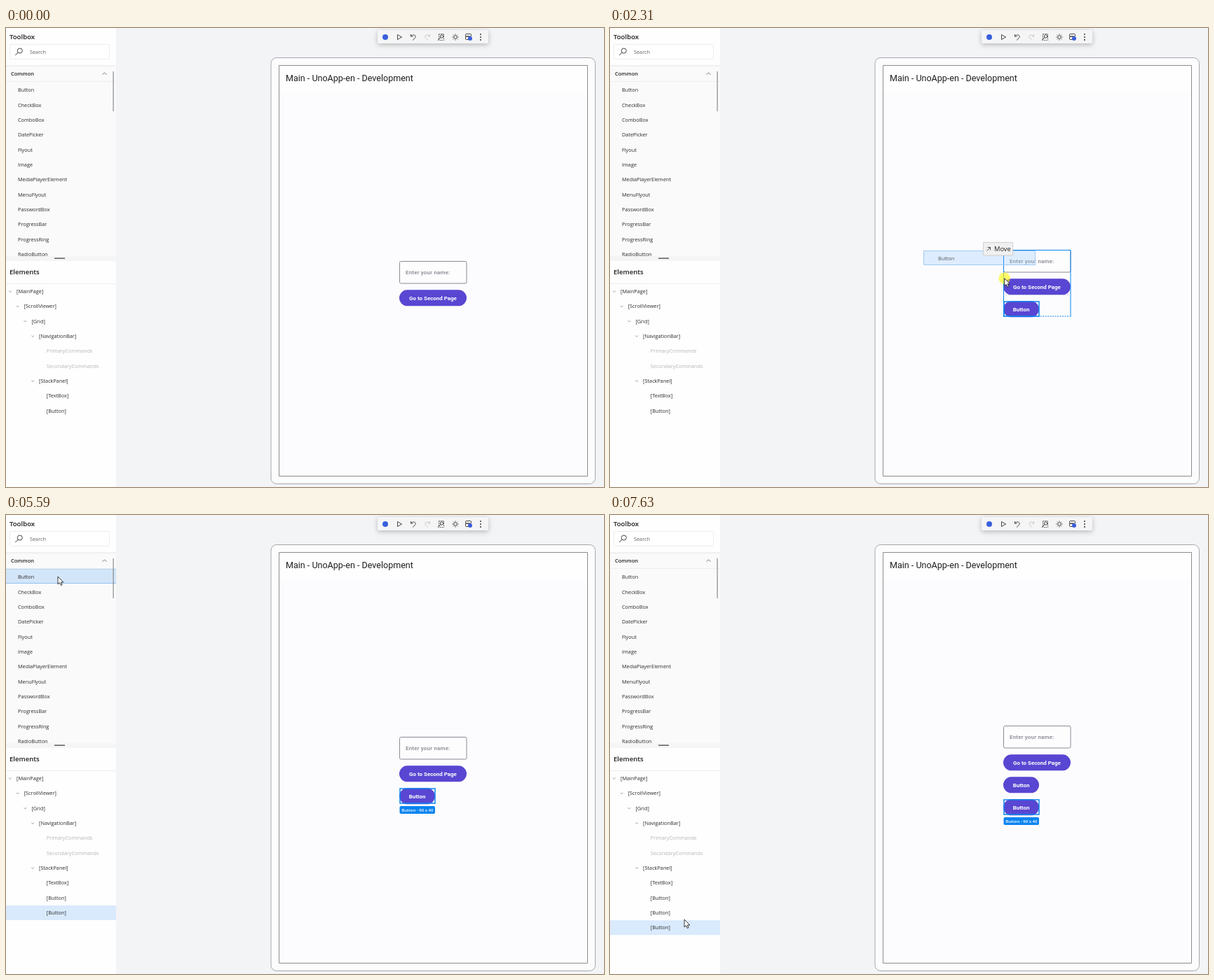
Write an HTML page with a canvas that moves like this. It is 853 px wide and 656 px high and loops after 8 s.

```html
<!DOCTYPE html>
<html lang="en">
<head>
<meta charset="utf-8">
<title>Drag from toolbox</title>
<style>
html, body { margin: 0; width: 853px; height: 656px; overflow: hidden; }
canvas { display: block; }
</style>
</head>
<body>
<canvas id="stage" width="853" height="656"></canvas>
<script>
const ctx = document.getElementById('stage').getContext('2d');
const LOOP = 8000, ROW = 21.33, LAG = 70;
const BLUE = '#0a84f0', PURPLE = '#5946d2', INK = '#2b2b2b';
const SANS = '"Open Sans", sans-serif', ROBOTO = 'Roboto, sans-serif';

const TOOLS = ['Button', 'CheckBox', 'ComboBox', 'DatePicker', 'Flyout', 'Image', 'MediaPlayerElement',
  'MenuFlyout', 'PasswordBox', 'ProgressBar', 'ProgressRing', 'RadioButton'];
// depth, label
const TREE = [[0, 'MainPage'], [1, 'ScrollViewer'], [2, 'Grid'], [3, 'NavigationBar'], [4, 'PrimaryCommands'],
  [4, 'SecondaryCommands'], [3, 'StackPanel'], [4, 'TextBox'], [4, 'Button']];

// pointer path: time, x, y
const PATH = [[160, 500, 420], [940, 86, 104], [1000, 86, 90], [1610, 86, 90], [2010, 393, 226], [2370, 582, 375],
  [2760, 594, 401], [2830, 594, 404], [3640, 594, 404], [4460, 192, 262], [4810, 90, 138], [5120, 74, 88],
  [5590, 74, 88], [6050, 160, 200], [6240, 150, 318], [6380, 113, 470], [6460, 108, 545], [6950, 106, 578],
  [8000, 106, 578]];

function slope(i, k) {
  const a = PATH[i - 1], b = PATH[i], c = PATH[i + 1];
  if (!a || !c || (b[k] - a[k]) * (c[k] - b[k]) <= 0) return 0;
  return (c[k] - a[k]) / (c[0] - a[0]);
}

function pointer(t) {
  let i = 0;
  while (i < PATH.length - 2 && t >= PATH[i + 1][0]) i++;
  const a = PATH[i], b = PATH[i + 1], d = b[0] - a[0];
  const u = Math.min(1, Math.max(0, (t - a[0]) / d)), v = 1 - u;
  const at = k => v * v * (1 + 2 * u) * a[k] + u * u * (3 - 2 * u) * b[k]
    + d * u * v * (v * slope(i, k) - u * slope(i + 1, k));
  return { x: at(1), y: at(2) };
}

const between = (t, a, b) => t >= a && t < b;
const inBox = (p, x, y, w, h) => between(p.x, x, x + w) && between(p.y, y, y + h);

function text(s, x, y, color = INK, size = 7.3, weight = 400, family = SANS, align = 'left') {
  ctx.font = `${weight} ${size}px ${family}`;
  ctx.textAlign = align;
  ctx.fillStyle = color;
  ctx.fillText(s, x, y);
}

function box(x, y, w, h, fill, stroke, r = 0, lw = 1) {
  ctx.beginPath();
  ctx.roundRect(x, y, w, h, r);
  paint(fill, stroke, lw);
}

function disc(x, y, r, fill, stroke, lw) {
  ctx.beginPath();
  ctx.arc(x, y, r, 0, 7);
  paint(fill, stroke, lw);
}

function paint(fill, stroke, lw = 1) {
  if (fill) { ctx.fillStyle = fill; ctx.fill(); }
  if (stroke) { ctx.strokeStyle = stroke; ctx.lineWidth = lw; ctx.stroke(); }
}

// SVG path drawn relative to x, y
function shape(d, x, y, stroke, lw = 1, fill) {
  ctx.save();
  ctx.translate(x, y);
  const p = new Path2D(d);
  if (fill) { ctx.fillStyle = fill; ctx.fill(p); }
  ctx.strokeStyle = stroke;
  ctx.lineWidth = lw;
  ctx.stroke(p);
  ctx.restore();
}

function toolbar() {
  ctx.save();
  ctx.shadowColor = 'rgba(0,0,0,.25)';
  ctx.shadowBlur = 7;
  ctx.shadowOffsetY = 2;
  box(530, 3, 158, 19, '#f5f5f6', null, 2);
  ctx.restore();
  disc(541, 13, 4, '#3a5fdc');
  shape('M-2.5-3.5L3.5 0L-2.5 3.5Z', 561, 13, '#333', .9);
  const undo = 'M-3.5-4V-1H-.5M-3.3-1.2C-1-4 3-3.5 3.2-.8C3.4 1 1 2.5-1 4.5';
  shape(undo, 581, 13, '#333', .9);
  ctx.save();
  ctx.translate(601, 13);
  ctx.scale(-1, 1);
  shape(undo, 0, 0, '#c4c4c4', .9);
  ctx.restore();
  ctx.setLineDash([1.5, 1]);
  box(617.5, 8.5, 7, 9, null, '#444', 0, .9);
  ctx.setLineDash([]);
  disc(621.5, 12, 2.2, '#f5f5f6', '#333', .9);
  shape('M0 0L-4 4', 620, 13.5, '#333');
  disc(641, 13, 2.3, null, '#333', .9);
  for (let i = 0; i < 8; i++) {
    const c = Math.cos(i * Math.PI / 4), s = Math.sin(i * Math.PI / 4);
    shape(`M${c * 3.4} ${s * 3.4}L${c * 4.7} ${s * 4.7}`, 641, 13, '#333', .9);
  }
  box(655.5, 8.5, 8, 3.5, null, '#333', 1, .9);
  box(655.5, 12, 6, 4.5, null, '#333', 1, .9);
  disc(662, 15, 3, '#3a5fdc');
  for (const y of [9, 13, 17]) disc(677, y, .9, '#222');
}

function toolbox(hoverRow) {
  box(0, 0, 157, 656, '#fefefe');
  text('Toolbox', 5, 16, '#1d1d1d', 9.6, 600);
  box(5.5, 23.5, 142, 21, '#fff', '#ececec', 1);
  disc(19.8, 32.5, 3.5, null, '#333', .9);
  shape('M0 0L-4 4', 17.3, 35, '#333');
  text('Search', 34, 36.7, '#606060');
  box(0, 54, 157, 272, '#fafafa');
  box(0, 53.5, 157, 1, '#e5e5e5');
  box(0, 76, 157, 1, '#eeeeee');
  text('Common', 7, 67.8, '#222', 7.5, 600);
  shape('M-3 1.5L0-1.5L3 1.5', 140.5, 65.3, '#555', .8);
  if (hoverRow >= 0) {
    const y = 77 + hoverRow * ROW;
    box(0, y, 157, 21, '#d3e6f9');
    box(0, y, 157, 1, '#b5d5f5');
    box(0, y + 20, 157, 1, '#8fbfee');
  }
  TOOLS.forEach((name, i) => text(name, 17, 91.2 + i * ROW));
  box(152.5, 62, 1.2, 57, '#8a8a8a');
  box(0, 326, 157, 7, '#f5f5f6');
  box(69, 328.5, 15, 1.3, '#444');
}

function elements(count) {
  text('Elements', 5, 351.5, '#1d1d1d', 9.6, 600);
  box(0, 365, 157, 1, '#ececec');
  const rows = TREE.concat(Array(count).fill([4, 'Button']));
  if (count) box(0, 366 + (rows.length - 1) * ROW, 157, 21, '#d9eafc');
  rows.forEach(([depth, name], i) => {
    const y = 376.5 + i * ROW, x = 15 + depth * 10.7, muted = name.endsWith('Commands');
    text(muted ? name : `[${name}]`, x, y + 2.6, muted ? '#b5b5b5' : INK);
    if (depth < 4) shape('M-1.8-1L0 1L1.8-1', x - 9, y, '#777', .7);
  });
}

function pill(label, y, w) {
  box(561, y, w, 23, PURPLE, null, 11.5);
  text(label, 561 + w / 2, y + 14.4, '#fff', 7.95, 600, ROBOTO, 'center');
}

function page(count, preview, hover) {
  box(378, 42.5, 462.5, 609, '#fcfcfd', '#a4a7ab', 8);
  box(389.5, 53.5, 440, 587, '#fcfcfe', '#8d8d8f');
  box(390, 54, 439, 38, '#fefefe');
  text('Main - UnoApp-en - Development', 399, 76, '#1f1f22', 12.54, 400, ROBOTO);
  if (hover) box(389.5, 54.5, 440, 586, null, BLUE);

  const n = count + (preview ? 1 : 0), top = 333 - 16 * n;
  box(561.5, top + .5, 95.5, 31.5, '#fdfdfe', '#8c8a94', 2);
  ctx.letterSpacing = '.2px';
  text('Enter your name:', 570, top + 19.3, '#85838c', 7.98, 500, ROBOTO);
  ctx.letterSpacing = '0px';
  pill('Go to Second Page', top + 41.3, 96);
  for (let i = 0; i < n; i++) pill('Button', top + 73.3 + i * 32, 51);
  if (!n) return;

  const y = top + 42 + 32 * n;
  box(562, y, 50, 21, null, BLUE, 0, 1.5);
  if (preview) {
    shape('M0 32V0H95.5V95', 561.5, top + .5, BLUE);
    shape('M0 32V95', 561.5, top + .5, BLUE);
    ctx.setLineDash([2, 1.5]);
    shape('M0 0H96', 561, top + 95, BLUE);
    shape('M0 0H96', 561, top + 64.5, '#b9b6d8', .8);
    ctx.setLineDash([]);
  } else {
    box(561.5, y + 25, 50.5, 11, BLUE, null, 2);
    text('Button - 90 x 40', 586.8, y + 32.8, '#fff', 6, 600, SANS, 'center');
  }
}

function ghost(p) {
  const x = Math.round(p.x - 85), y = Math.round(p.y - 12);
  const overTree = p.x < 157 && p.y >= 366, row = Math.floor((p.y - 366) / ROW);
  if (overTree) box(.5, 366.5 + row * ROW, 156, 21, null, '#3f9bea');
  box(x + .5, y + .5, 159, 20, 'rgba(130,190,250,.26)', '#a0c9f0');
  text('Button', x + 21, y + 13.5, '#555');

  const allowed = overTree ? row >= 6 : inBox(p, 389, 53, 440, 587);
  box(x + 85.5, y - 11.5, allowed ? 42 : 25, 18.5, '#f0f0f0', '#d0d0d0');
  if (allowed) {
    shape('M-2.5 2.5L2.5-2.5M-1.5-2.5H2.5V1.5', x + 93, y - 2, '#444', .9);
    text('Move', x + 101, y + 1.3, '#222', 9.3);
  } else {
    const color = overTree ? '#b8323a' : '#cf8a1c';
    disc(x + 95.5, y - 2, 4, null, color, 1.2);
    shape('M-2.8-2.8L2.8 2.8', x + 95.5, y - 2, color, 1.2);
  }
}

function draw(t) {
  const p = pointer(t);
  // the dragged item trails the pointer and settles just before the drop
  const held = between(t, 2830, 3170) ? 2830 : between(t, 6950, 7230) ? 6950 : t;
  const trail = pointer(held - LAG);
  const dragging = between(t, 1610, 3390) || between(t, 5650, 7630);
  const pressed = between(t, 1150, 3170) || between(t, 5650, 7420);
  const preview = between(t, 2300, 3390);
  const count = t < 3390 ? 0 : t < 7630 ? 1 : 2;
  const probe = dragging ? trail : p;
  const hover = t >= 160 && !preview && inBox(probe, 389, 53, 440, 587) && !inBox(probe, 561, 317, 97, 96);
  const hoverRow = t >= 160 && !dragging && inBox(p, 0, 77, 157, 249) ? Math.floor((p.y - 77) / ROW) : -1;

  box(0, 0, 853, 656, '#f3f4f6');
  toolbar();
  page(count, preview, hover);
  toolbox(hoverRow);
  elements(count);
  if (dragging) ghost(trail);
  if (t < 160) return;
  if (pressed) disc(p.x, p.y, 8.3, 'rgba(255,246,0,.6)');
  shape('M0 0V11L2.5 8.7L4.3 12.6L6.1 11.8L4.4 8.1H7.8Z', p.x, p.y, '#222', .9, '#fff');
}

function frame() {
  draw(performance.now() % LOOP);
  requestAnimationFrame(frame);
}
frame();
</script>
</body>
</html>
```
